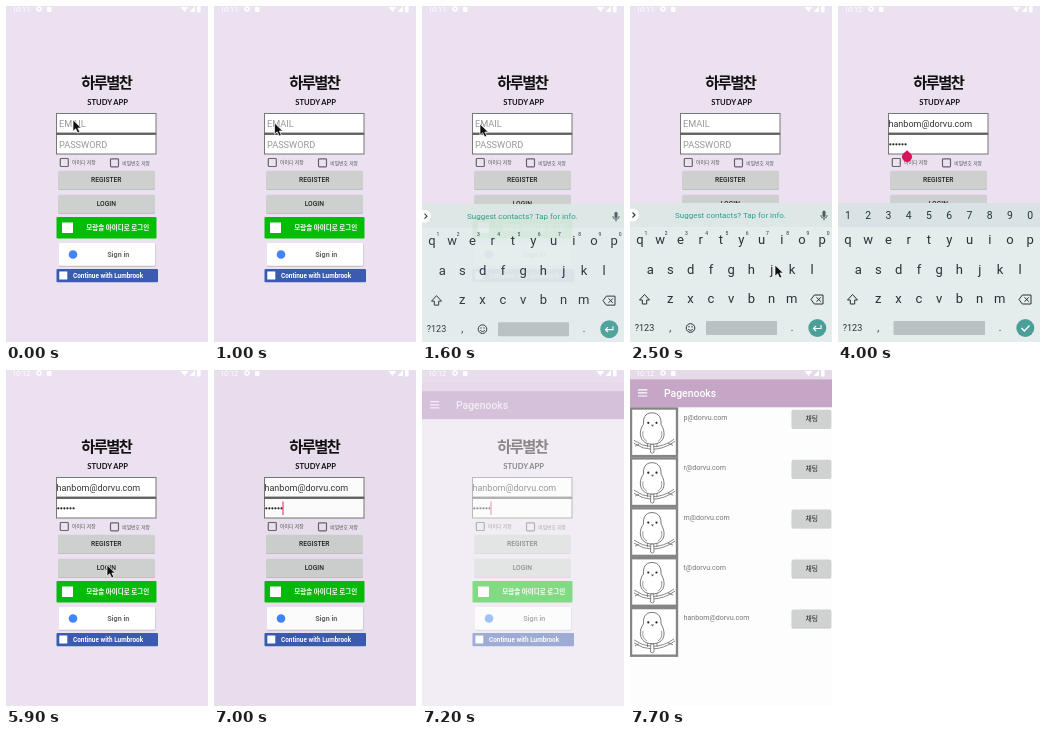
An HTML page that plays this animation: 202 px wide and 336 px high, repeating every 8 s.

```html
<!DOCTYPE html>
<html lang="ko">
<head>
<meta charset="utf-8">
<style>
html, body { margin: 0; width: 100%; height: 100%; overflow: hidden; background: #fff; }
svg { display: block; width: 100vw; height: 100vh; font-family: Roboto, "Noto Sans CJK KR", "Noto Sans CJK", sans-serif; }
.mid { text-anchor: middle; }
.title { letter-spacing: -1.6px; }
.subtitle { font-family: Lato, sans-serif; }
</style>
</head>
<body>
<svg id="stage" viewBox="0 0 202 336"></svg>
<script>
const LOOP = 8000;
const EMAIL = 'hanbom@dorvu.com';
const stage = document.getElementById('stage');

const rect = (x, y, w, h, fill, extra = '') =>
  `<rect x="${x}" y="${y}" width="${w}" height="${h}" fill="${fill}" ${extra}/>`;
const circle = (x, y, r, fill, extra = '') =>
  `<circle cx="${x}" cy="${y}" r="${r}" fill="${fill}" ${extra}/>`;
const line = (d, color, width = 1, extra = '') =>
  `<path d="${d}" fill="none" stroke="${color}" stroke-width="${width}" ${extra}/>`;
const text = (x, y, size, fill, str, extra = '') =>
  `<text x="${x}" y="${y}" font-size="${size}" fill="${fill}" ${extra}>${str}</text>`;
const center = (x, y, size, fill, str, weight = 400, style = '') =>
  text(x, y, size, fill, str, `class="mid ${style}" font-weight="${weight}"`);
const group = (id, content, extra = '') => `<g id="${id}" ${extra}>${content}</g>`;
const repeat = (n, make) => Array.from({ length: n }, (_, i) => make(i)).join('');

const field = y => rect(50.5, y, 99.5, 19.5, '#fff', 'stroke="#777" stroke-width="1"');
const checkbox = (x, y) => rect(x, y, 8, 8, 'none', 'rx=".8" stroke="#666" stroke-width="1.2"');
const grayButton = (y, label) =>
  rect(52, y + .7, 97, 18.5, '#bfc0c0', 'rx="1.5"') + rect(52, y, 97, 18.3, '#cdd0ce', 'rx="1.5"') +
  center(100.3, y + 11.6, 6.7, '#222', label, 500);

function loginPage() {
  return rect(0, 0, 202, 336, '#ebe1f0') +
    center(100.3, 82.3, 15.3, '#111', '하루별찬', 700, 'title') +
    center(101.7, 99, 7.6, '#111', 'STUDY APP', 700, 'subtitle') +
    field(107.5) + field(128.5) + line('M50 127.8H150.5', '#444') +
    text(53, 121, 9.2, '#999', 'EMAIL', 'id="emailHint"') +
    text(53, 141.8, 9.2, '#999', 'PASSWORD', 'id="passHint"') +
    text(50.5, 121, 9, '#333', '', 'id="email"') +
    group('dots', repeat(6, i => circle(52.3 + i * 3.05, 138.3, 1.1, '#222'))) +
    checkbox(54.3, 152.5) + text(66, 158.4, 4.9, '#555', '아이디 저장') +
    checkbox(104.5, 152.8) + text(116.3, 158.6, 4.8, '#555', '비밀번호 저장') +
    grayButton(164.7, 'REGISTER') + grayButton(188.7, 'LOGIN') +
    rect(50.5, 211, 100, 21.5, '#05bc08', 'rx="1"') + rect(56, 216.5, 11, 10.5, '#fff') +
    center(111.8, 224.3, 6.5, '#fff', '모람솔 아이디로 로그인', 700) +
    rect(53, 238, 96.5, 22.8, '#c4bcc8', 'rx="1"') + rect(53, 237, 96, 22.7, '#fff', 'rx="1"') +
    circle(67, 248.5, 4.3, '#4285f4') + center(112.3, 251.2, 7.2, '#696969', 'Sign in', 700) +
    rect(50.5, 263, 101.5, 13.3, '#3b5bb0', 'rx="1"') + rect(53.3, 265.5, 8, 8, '#fff') +
    text(67, 272, 6.4, '#fff', 'Continue with Lumbrook', 'font-weight="700"') +
    line('M69 131.5V145', '#e0215f', 1, 'id="caret"') +
    group('handle', '<path d="M69 144.2L72.9 147.8A4.9 4.9 0 1 1 65.1 147.8Z" fill="#d8145a"/>');
}

function keyboard() {
  const ink = '#263238';
  const column = i => 10 + i * 20.25;
  const row = (letters, x, y) =>
    [...letters].map((c, i) => center(x + i * 20.25, y, 13, ink, c)).join('');
  const digits = (dx, y, size) =>
    repeat(10, i => center(column(i) + dx, y, size, ink, (i + 1) % 10));
  const spaceBar = x => rect(x, 315, 147 - x, 14, '#b9c1c2', 'rx="1"');
  const suggestions =
    rect(0, 197, 202, 24, '#dde8e6') + circle(2.5, 209, 6.5, '#fff') +
    line('M2.5 206.5L5 209L2.5 211.5', '#333', 1.1) +
    center(100.5, 212, 8, '#2d9c91', 'Suggest contacts? Tap for info.') +
    rect(192.5, 204.5, 3, 6.5, '#4c5a60', 'rx="1.5"') +
    line('M190.8 209A3.2 3.2 0 0 0 197.2 209M194 212V214.5', '#4c5a60', .9) +
    digits(5.8, 229, 5) +
    circle(60.5, 322, 4.3, 'none', `stroke="${ink}" stroke-width="1"`) +
    circle(59, 320.8, .7, ink) + circle(62, 320.8, .7, ink) +
    line('M58.2 323A2.6 2.6 0 0 0 62.8 323', ink, .9) + spaceBar(76);
  const enterArrow = line('M191 319V322.5H183.5M186 320L183.5 322.5L186 325', '#fff', 1.1);
  const numberRow = rect(0, 197, 202, 24, '#d9e2e4') + digits(0, 212.8, 10.4) + spaceBar(55.5);
  return rect(0, 197, 202, 139, '#e4ecec') +
    row('qwertyuiop', 10, 238) + row('asdfghjkl', 20.2, 267.5) + row('zxcvbnm', 40.3, 297) +
    line('M14.5 288.5L9.5 294H12.3V298H16.7V294H19.5Z', ink, 1) +
    line('M181 293.5L184.3 289H193V298H184.3ZM186.5 291.3L190.8 295.7M190.8 291.3L186.5 295.7', ink, 1) +
    center(14.5, 325.3, 9, ink, '?123') + center(40.3, 324.5, 10, ink, ',') +
    center(162, 325, 10, ink, '.') + circle(187.3, 322, 9, '#4a9f99') +
    group('textKeys', suggestions + enterArrow) +
    group('passKeys', numberRow + line('M183.5 322L186.3 325L191.5 319.5', '#fff', 1.3));
}

function bird() {
  const ink = '#555';
  return rect(1, 1.2, 46, 47.6, '#fff', 'stroke="#858585" stroke-width="2.4"') +
    line('M4 33Q12 39 22 39.5Q34 39.5 44 32M4 36Q13 42 22 42Q34 42 45 34M9 37L5 39M38 36L43 38', ink, .7) +
    `<path d="M22 5.5C15 5.5 13 11 13.5 17C8 24 9 36.5 22 37C36 36.5 36 25 31 17C31.5 11 29 5.5 22 5.5Z" fill="#fff" stroke="${ink}" stroke-width=".8"/>` +
    `<path d="M20.8 37L20.5 45Q22.3 47 24 45L23.7 37Z" fill="#fff" stroke="${ink}" stroke-width=".7"/>` +
    line('M13 24Q11.5 31 17 34M31.5 24Q33 31 28 34M17.5 36V40M27 36V40', ink, .6) +
    circle(18.3, 15.5, 1.1, '#222') + circle(26.5, 15.5, 1.1, '#222') +
    '<path d="M21 17.5H24L22.5 19.5Z" fill="#555"/>';
}

function listPage() {
  const people = ['p@dorvu.com', 'r@dorvu.com', 'm@dorvu.com', 't@dorvu.com', EMAIL];
  const rows = people.map((address, i) => `<g transform="translate(0 ${37.3 + i * 49.9})">` +
    bird() + text(53.5, 12.7, 7.1, '#777', address) +
    rect(161.7, 3.2, 39.5, 18.3, '#c2c3c3', 'rx="1.5"') + rect(161.7, 2.5, 39.5, 18.3, '#d0d2d1', 'rx="1.5"') +
    center(181.8, 14.2, 6.8, '#222', '채팅', 500) + '</g>').join('');
  return rect(0, 0, 202, 336, '#fdfdfd') + rect(0, 0, 202, 9.5, '#e6d9e8') +
    rect(0, 9.3, 202, 28, '#c5a6c7') +
    line('M8 19.8H17.3M8 22.9H17.3M8 26H17.3', '#fff', 1.2) +
    text(34, 26.8, 10.4, '#fff', 'Pagenooks', 'font-weight="500"') + group('rows', rows);
}

const statusBar =
  text(6, 6.2, 7.3, '#fff', '', 'id="clock"') +
  circle(33, 3, 2, 'none', 'stroke="#fff" stroke-width="1.5"') +
  rect(41, 1, 4.5, 5, '#fff', 'rx=".7"') +
  '<path d="M174.5 1H182.5L178.5 6ZM183.5 6H189V0Z" fill="#fff"/>' +
  rect(191, 0, 3.6, 6.5, '#fff', 'rx=".5"');
const arrow = '<path d="M0 0V11.2L2.7 8.8L4.7 13L6.8 12L4.9 8H8.3Z" fill="#111" stroke="#fff" stroke-width=".7"/>';

stage.innerHTML = loginPage() + group('keyboard', keyboard()) +
  rect(0, 0, 202, 336, '#000', 'id="dim"') + group('list', listPage()) +
  statusBar + group('cursor', arrow);

const part = Object.fromEntries([...stage.querySelectorAll('[id]')].map(el => [el.id, el]));
const show = (id, on) => part[id].setAttribute('opacity', Number(on));
const write = (id, str) => { if (part[id].textContent !== str) part[id].textContent = str; };
const progress = (t, from, to) => Math.min(1, Math.max(0, (t - from) / (to - from)));
const ease = p => p * p * (3 - 2 * p);

// Each stop: time, x, y of the pointer tip
const pointerPath = [
  [0, 67, 114], [100, 67, 114], [300, 63, 116], [700, 63, 116], [1300, 58, 118],
  [1800, 58, 118], [2400, 145, 259], [4300, 145, 259], [4800, 164, 160],
  [5100, 164, 160], [5800, 101, 195], [LOOP, 101, 195]
];

function pointerAt(t) {
  const i = pointerPath.findIndex(stop => stop[0] > t);
  const [t0, x0, y0] = pointerPath[i - 1], [t1, x1, y1] = pointerPath[i];
  const p = ease(progress(t, t0, t1));
  return [x0 + (x1 - x0) * p, y0 + (y1 - y0) * p];
}

function draw(now) {
  const t = now % LOOP;
  const letters = Math.floor(progress(t, 2550, 3250) * EMAIL.length);
  const dots = Math.floor(progress(t, 3350, 3900) * 6);
  write('clock', t < 2700 ? '10:11' : '10:12');
  write('email', EMAIL.slice(0, letters));
  show('emailHint', letters === 0);
  show('passHint', dots === 0);
  [...part.dots.children].forEach((dot, i) => dot.setAttribute('opacity', Number(i < dots)));
  show('handle', t >= 3900 && t < 5900);
  show('caret', t >= 5900 && Math.floor(t / 500) % 2 === 0);

  const opening = progress(t, 1450, 1610), closing = progress(t, 4150, 4350);
  show('keyboard', opening * (1 - closing));
  part.keyboard.setAttribute('transform', `translate(0 ${(1 - opening) * 20 + closing * 60})`);
  show('textKeys', t < 3300);
  show('passKeys', t >= 3300);

  const entering = ease(progress(t, 7050, 7350));
  show('dim', progress(t, 6850, 7000) * .015);
  show('list', entering);
  part.list.setAttribute('transform', `translate(0 ${(1 - entering) * 24})`);
  show('rows', t >= 7400);

  show('cursor', t < 2650 || (t >= 4400 && t < 6850));
  part.cursor.setAttribute('transform', `translate(${pointerAt(t)})`);
}

const start = performance.now();
function tick() {
  draw(performance.now() - start);
  requestAnimationFrame(tick);
}
tick();
</script>
</body>
</html>
```
